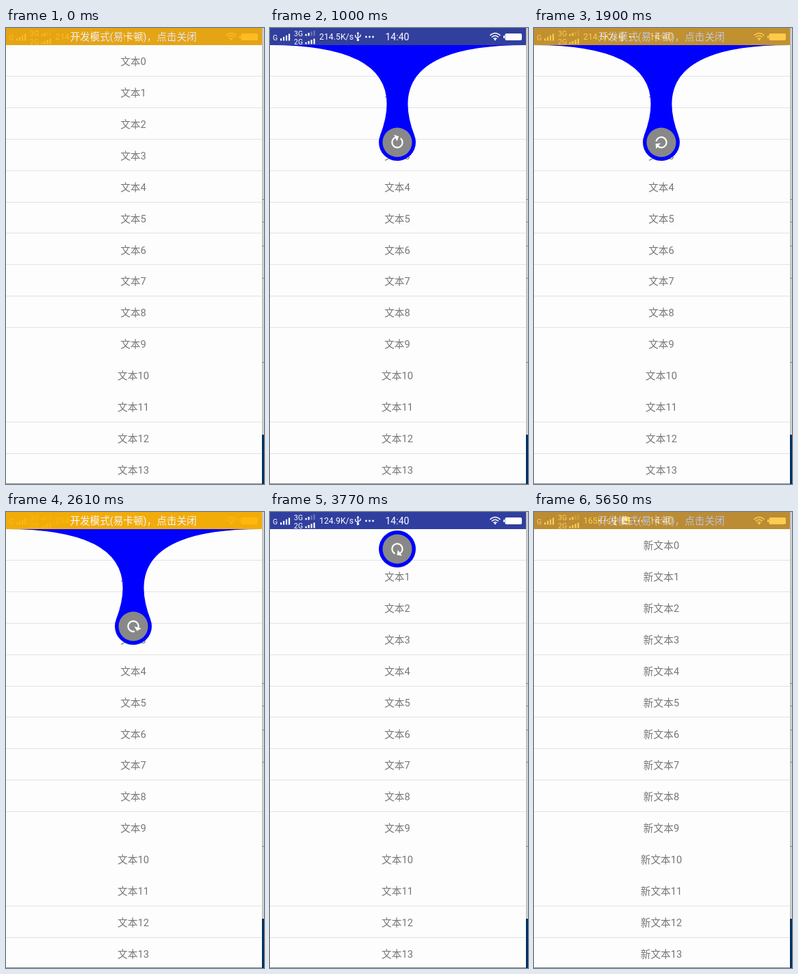
Recreate the animation shown at these times as an HTML page. Size 377 by 666 pixels, loop 5.75 s.

```html
<!DOCTYPE html>
<html lang="zh-CN">
<head>
<meta charset="utf-8">
<title>下拉刷新</title>
<style>
  html, body { margin: 0; width: 100%; height: 100%; overflow: hidden; background: #fdfdfd; }
  svg { display: block; width: 377px; height: 666px; }
  text { font-family: Roboto, "Noto Sans CJK SC", "Noto Sans CJK", sans-serif; }
  #rows text { font-size: 14.7px; fill: #767676; text-anchor: middle; }
  #status { fill: #fff; }
</style>
</head>
<body>
<svg viewBox="0 0 377 666">
  <rect width="377" height="666" fill="#fdfdfd"/>
  <g id="rows"></g>

  <path id="neck" fill="#00f"/>
  <g id="ball">
    <circle r="27" fill="#00f"/>
    <circle r="21.5" fill="#888"/>
    <g id="icon">
      <path transform="scale(1.08) translate(-12 -12)" fill="#fff" d="M17.65 6.35C16.2 4.9 14.21 4 12 4c-4.42 0-7.99 3.58-7.99 8s3.57 8 7.99 8c3.73 0 6.84-2.55 7.73-6h-2.08c-.82 2.33-3.04 4-5.65 4-3.31 0-6-2.69-6-6s2.69-6 6-6c1.66 0 3.14.69 4.22 1.78L13 11h7V4z"/>
    </g>
  </g>

  <rect width="374" height="25" fill="#303f9f"/>
  <g id="status">
    <text x="4" y="18" font-size="10.5">G</text>
    <text x="35" y="12" font-size="10.5">3G</text>
    <text x="35" y="24" font-size="10.5">2G</text>
    <g id="bars"></g>
    <text id="speed" x="72" y="17.3" font-size="12.3"></text>
    <g id="tray">
      <g fill="none" stroke="#fff" stroke-width="1.3">
        <path d="M128.5 8V17M124.8 10v3l3.7 2.5M132.2 9.500v2.500l-3.700 2.500"/>
      </g>
      <path d="M128.500 5.500l2 3h-4z"/>
      <circle cx="128.500" cy="17.500" r="1.700"/>
      <g id="picture">
        <rect x="138" y="7" width="12" height="11" rx="1.500"/>
        <path d="M140 16l3-4 2 2 1.500-1.500 2 3.500z" fill="#303f9f"/>
      </g>
      <g id="dots">
        <circle cx="140.500" cy="13" r="1.400"/>
        <circle cx="145.500" cy="13" r="1.400"/>
        <circle cx="150.500" cy="13" r="1.400"/>
      </g>
    </g>
    <text x="168.500" y="18" font-size="14">14:40</text>
    <g fill="none" stroke="#fff" stroke-width="1.500">
      <path d="M321.500 11Q329 4 336.500 11M324 13.500Q329 9 334 13.500M326.500 16Q329 13.500 331.500 16"/>
    </g>
    <circle cx="329" cy="17" r="1.200"/>
    <rect x="343.500" y="8" width="24.500" height="10" rx="2"/>
    <rect x="341" y="11" width="2" height="4" rx="1"/>
  </g>
  <g id="notice">
    <rect width="374" height="25" fill="#ffb300"/>
    <text x="186" y="17.500" font-size="14.600" fill="#fff" text-anchor="middle">开发模式(易卡顿)，点击关闭</text>
  </g>

  <g id="edge">
    <rect x="374" width="3" height="666" fill="#dcdcdc"/>
    <rect x="374.500" width="1" height="666" fill="#a8a8a8"/>
    <rect x="374" y="594" width="3" height="72" fill="#00305f"/>
    <rect y="665" width="374" height="1" fill="#8c8c8c"/>
  </g>
  <path id="cursor" d="M0 0V15.500L3.600 12.200L6.300 18.300L8.800 17.200L6.200 11.300H11.300Z" fill="#fff" stroke="#111"/>
</svg>
<script>
const LOOP = 5750, CX = 186, BAR = 25, RADIUS = 27, PULL = 169, REST_Y = 54;
const LOADED = 4240;
const $ = id => document.getElementById(id);
const clamp = x => Math.min(1, Math.max(0, x));
const smooth = (t, from, to) => {
  const x = clamp((t - from) / (to - from));
  return x * x * (3 - 2 * x);
};

function add(parent, tag, attrs) {
  const el = document.createElementNS('http://www.w3.org/2000/svg', tag);
  for (const key in attrs) el.setAttribute(key, attrs[key]);
  return parent.appendChild(el);
}

const labels = [];
for (let i = 0; i < 14; i++) {
  labels.push(add($('rows'), 'text', { x: CX, y: 53.8 + i * 45.95 }));
  if (i < 13 && i !== 9 && i !== 10) {
    add($('rows'), 'rect', { y: Math.floor(70.2 + i * 45.95), width: 374, height: 1, fill: '#e2e2e2' });
  }
}

function signal(x, bottom, height, lit) {
  for (let i = 0; i < 4; i++) {
    const h = height * (i + 1.5) / 4.5;
    add($('bars'), 'rect', { x: x + i * 4, y: bottom - h, width: 2.2, height: h, opacity: i < lit ? 1 : 0.3 });
  }
}
signal(15, 18.5, 10, 4);
signal(51.5, 11.5, 8, 2);
signal(51.5, 23.5, 8, 4);

for (const y of [250, 283, 318, 365, 488]) {
  add($('edge'), 'rect', { x: 374, y, width: 3, height: 1, fill: '#888' });
}

// Two curves from the bar's ends, tangent to the hanging ball.
function neckPath(pull, cy) {
  if (pull < 0.01) return '';
  const angle = pull * 111 * Math.PI / 180;
  const dx = Math.sin(angle) * RADIUS;
  const y = cy + Math.cos(angle) * RADIUS;
  const ctrl = dx + (y - BAR) / Math.tan(angle);
  return `M0 ${BAR}Q${CX - ctrl} ${BAR} ${CX - dx} ${y}` +
    `A${RADIUS} ${RADIUS} 0 0 0 ${CX + dx} ${y}Q${CX + ctrl} ${BAR} 373 ${BAR}Z`;
}

function drawPull(t) {
  const pull = smooth(t, 100, 1000) - smooth(t, 3040, 3620);
  const tipY = BAR + PULL * pull - RADIUS;
  const hiddenY = BAR - RADIUS;
  const leave = smooth(t, LOADED, LOADED + 200);
  const ballY = t < 3000 ? tipY : Math.max(tipY, REST_Y + (hiddenY - REST_Y) * leave);
  const turn = t < 1203 ? 292 * pull : 0.346 * (t - 1400);
  $('neck').setAttribute('d', neckPath(pull, tipY));
  $('ball').setAttribute('transform', `translate(${CX} ${ballY})`);
  $('icon').setAttribute('transform', `rotate(${turn})`);
}

function drawStatus(t) {
  const late = t >= 5250;
  $('speed').textContent = late ? '165K/s' : t < 3200 ? '214.5K/s' : '124.9K/s';
  $('tray').setAttribute('transform', `translate(${late ? -10 : 0} 0)`);
  $('picture').setAttribute('visibility', late ? 'visible' : 'hidden');
  $('dots').setAttribute('transform', `translate(${late ? 17 : 0} 0)`);
  $('notice').setAttribute('opacity', 0.5 + 0.5 * Math.cos(2 * Math.PI * (t - 2400) / 2720));
}

function drawCursor(t) {
  const go = smooth(t, 4820, 5250);
  $('cursor').setAttribute('transform', `translate(${201.5 + 14 * go} ${436.5 + 234 * go})`);
  $('cursor').setAttribute('visibility', t >= 4620 && t < 5250 ? 'visible' : 'hidden');
}

function draw(t) {
  labels.forEach((label, i) => { label.textContent = (t < LOADED ? '文本' : '新文本') + i; });
  drawPull(t);
  drawStatus(t);
  drawCursor(t);
}

const start = performance.now();
function tick() {
  draw((performance.now() - start) % LOOP);
  requestAnimationFrame(tick);
}
tick();
</script>
</body>
</html>
```
